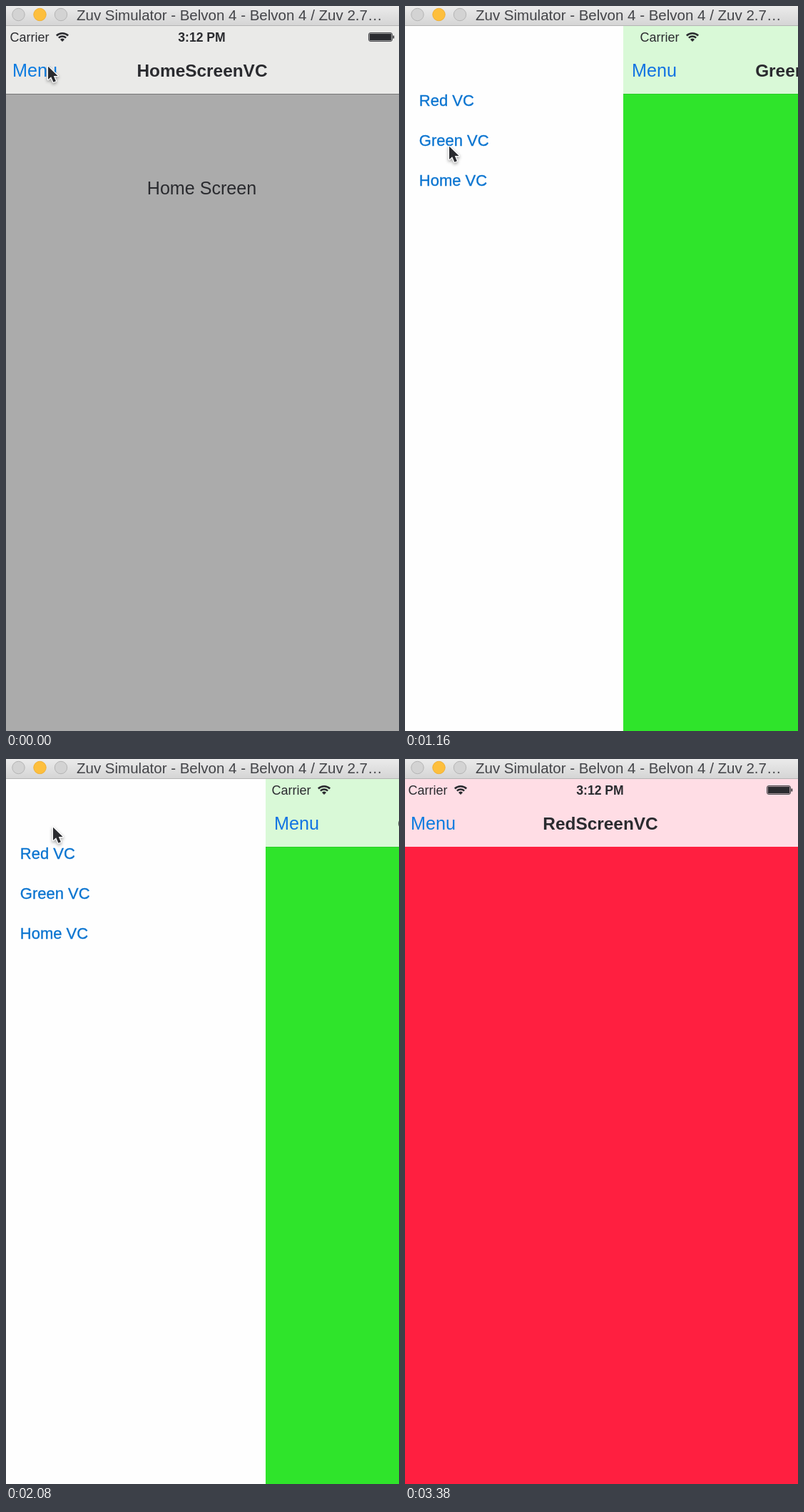
These frames come from a looping animation (551x1016 px, 3420 ms). An HTML page with a canvas:

```html
<!DOCTYPE html>
<html lang="en">
<head>
<meta charset="utf-8">
<title>Drawer menu</title>
<style>
  html, body { margin: 0; width: 100%; height: 100%; overflow: hidden; background: #fff; }
  canvas { display: block; width: 551px; height: 1016px; }
</style>
</head>
<body>
<canvas id="stage" width="551" height="1016"></canvas>
<script>
const ctx = document.getElementById('stage').getContext('2d');
const W = 551, H = 1016, LOOP = 3420, STEP = 20;
const FONT = '"Liberation Sans", Arial, sans-serif';
const INK = '#2a2b2f';
const CLOSED = -4, OPEN = 397, OUT = 552;
const STATUS_DELAY = 13;

const PAGES = {
  home: { title: 'HomeScreenVC', bar: '#eaeae8', body: '#ababab', line: '#777777', link: '#0b7be0' },
  green: { title: 'GreenScreenVC', bar: '#d9f9d7', body: '#2fe42b', line: '#2bcb28', link: '#1273e2' },
  red: { title: 'RedScreenVC', bar: '#ffdde5', body: '#ff1f40', line: '#ff1f40', link: '#0b7be0' }
};

// Drawer slides: start, end, from, to
const SLIDES = [
  [-11, 311, CLOSED, OPEN],
  [782, 950, OPEN, OUT],
  [950, 1400, OUT, CLOSED],
  [1823, 2145, CLOSED, OPEN],
  [2525, 2693, OPEN, OUT],
  [2693, 3143, OUT, CLOSED]
];

// Pointer stops: time, x, y
const POINTER = [
  [0, 58, 83], [300, 58, 83], [680, 61, 195], [1280, 61, 195],
  [1640, 65, 94], [2130, 65, 94], [2400, 55, 120], [2530, 55, 120], [2660, 62, -32]
];

const clamp = v => Math.max(0, Math.min(1, v));
const mix = (a, b, p) => a + (b - a) * p;
const smooth = p => p * p * (3 - 2 * p);

// cubic-bezier(.42, 0, .58, 1), solved by bisection
function easeInOut(x) {
  let lo = 0, hi = 1;
  for (let i = 0; i < 24; i++) {
    const s = (lo + hi) / 2, r = 1 - s;
    if (1.26 * s * r * r + 1.74 * s * s * r + s * s * s < x) lo = s; else hi = s;
  }
  return smooth(lo);
}

// The status bar starts closing a moment after the page, but lands with it.
function edgeAt(t, closeDelay = 0) {
  const [start, end, from, to] = SLIDES.filter(s => s[0] <= t).pop();
  const begin = from === OUT ? start + closeDelay : start;
  return Math.round(mix(from, to, easeInOut(clamp((t - begin) / (end - begin)))));
}

// Touch highlight: quick dip, hold, then fade back
function pressAlpha(t, down, up, done, low) {
  if (t < down || t >= done) return 1;
  return t < up ? low : mix(low, 1, (t - up) / (done - up));
}

function text(str, x, y, size, color, align = 'left', weight = 'normal') {
  ctx.font = `${weight} ${size}px ${FONT}`;
  ctx.textAlign = align;
  ctx.fillStyle = color;
  ctx.fillText(str, x, y);
}

function rect(x, y, w, h, color) {
  ctx.fillStyle = color;
  ctx.fillRect(x, y, w, h);
}

function faded(alpha, draw) {
  ctx.globalAlpha = alpha;
  draw();
  ctx.globalAlpha = 1;
}

function wifi(x, y) {
  const a = Math.PI / 4.1;
  ctx.strokeStyle = ctx.fillStyle = INK;
  ctx.lineWidth = 2.5;
  for (const r of [7.4, 11.8]) {
    ctx.beginPath();
    ctx.arc(x, y, r, -Math.PI / 2 - a, -Math.PI / 2 + a);
    ctx.stroke();
  }
  ctx.beginPath();
  ctx.moveTo(x, y);
  ctx.arc(x, y, 4.3, -Math.PI / 2 - a, -Math.PI / 2 + a);
  ctx.fill();
}

function battery(x, y) {
  ctx.strokeStyle = '#4a4a4e';
  ctx.lineWidth = 1;
  ctx.beginPath();
  ctx.roundRect(x + .5, y + .5, 33, 12, 2.5);
  ctx.stroke();
  rect(x + 1.6, y + 1.6, 30.8, 9.8, INK);
  rect(x + 34.5, y + 4.5, 1.7, 4, INK);
}

function statusBar(x) {
  text('Carrier', x + 8.6, 50, 18, INK);
  wifi(x + 82, 50);
  text('3:12 PM', x + 277.5, 50, 17.6, INK, 'center', 'bold');
  battery(x + 511, 37);
}

function page(name, t) {
  const p = PAGES[name], x = edgeAt(t);
  rect(x, 28, W + 10, 95, p.bar);
  rect(x, 123, W + 10, H - 123, p.body);
  rect(x, 123, W + 10, 1, p.line);
  statusBar(edgeAt(t, STATUS_DELAY));
  const alpha = Math.min(
    pressAlpha(t, 20, 60, 240, .35),
    pressAlpha(t, 1760, 1860, 2040, .38)
  );
  faded(alpha, () => text('Menu', x + 12, 99, 25.2, p.link));
  text(p.title, x + 278, 99, 24.4, INK, 'center', 'bold');
  if (name === 'home') text('Home Screen', x + 277.5, 264, 25.1, INK, 'center');
  if (name === 'green') text('Peek Inside', x + 469.5, 481, 22.3, '#1a6fd6', 'center');
}

function drawerMenu(t) {
  const items = [
    ['Red VC', 140, pressAlpha(t, 2420, 2520, 2640, .28)],
    ['Green VC', 196, pressAlpha(t, 680, 780, 890, .25)],
    ['Home VC', 252, 1]
  ];
  ctx.strokeStyle = '#0a74d0';
  ctx.lineWidth = .35;
  for (const [label, y, alpha] of items) {
    faded(alpha, () => {
      text(label, 19.8, y, 22, '#0a74d0');
      ctx.strokeText(label, 19.8, y);
    });
  }
}

function windowBar() {
  const g = ctx.createLinearGradient(0, 0, 0, 27);
  g.addColorStop(0, '#ebebeb');
  g.addColorStop(1, '#d5d5d5');
  rect(0, 0, W, 27, g);
  rect(0, 27, W, 1, '#b4b4b4');
  [[17.5, '#d3d3d3', '#b5b5b5'], [47.5, '#fdbf3d', '#f0b036'], [77, '#d3d3d3', '#b5b5b5']]
    .forEach(([x, fill, line]) => {
      ctx.beginPath();
      ctx.arc(x, 12, 8.7, 0, Math.PI * 2);
      ctx.fillStyle = fill;
      ctx.fill();
      ctx.strokeStyle = line;
      ctx.lineWidth = 1;
      ctx.stroke();
    });
  text('Zuv Simulator - Belvon 4 - Belvon 4 / Zuv 2.7…', 99, 19.5, 20.5, '#434448');
}

function pointer(t) {
  const i = POINTER.findIndex(k => k[0] > t);
  if (i < 0) return;
  const [t0, x0, y0] = POINTER[i - 1], [t1, x1, y1] = POINTER[i];
  const p = smooth((t - t0) / (t1 - t0));
  ctx.save();
  ctx.translate(mix(x0, x1, p) + 1, mix(y0, y1, p) + 1.8);
  ctx.scale(.91, .91);
  ctx.beginPath();
  [[0, 0], [0, 20], [4.6, 15.8], [8.2, 24], [12, 22.4], [8.6, 14.5], [15, 14.5]]
    .forEach(([x, y]) => ctx.lineTo(x, y));
  ctx.closePath();
  ctx.lineJoin = 'round';
  ctx.lineWidth = 2.8;
  ctx.strokeStyle = '#fff';
  ctx.shadowColor = 'rgba(0,0,0,.4)';
  ctx.shadowBlur = 4;
  ctx.shadowOffsetY = 2;
  ctx.stroke();
  ctx.shadowColor = 'transparent';
  ctx.fillStyle = INK;
  ctx.fill();
  ctx.restore();
}

function draw(t) {
  rect(0, 0, W, H, '#fefefe');
  drawerMenu(t);
  page(t < 950 ? 'home' : t < 2693 ? 'green' : 'red', t);
  windowBar();
  pointer(t);
}

const began = performance.now();
function tick() {
  const t = Math.max(0, performance.now() - began) % LOOP;
  draw(Math.floor(t / STEP) * STEP);
  requestAnimationFrame(tick);
}
tick();
</script>
</body>
</html>
```
